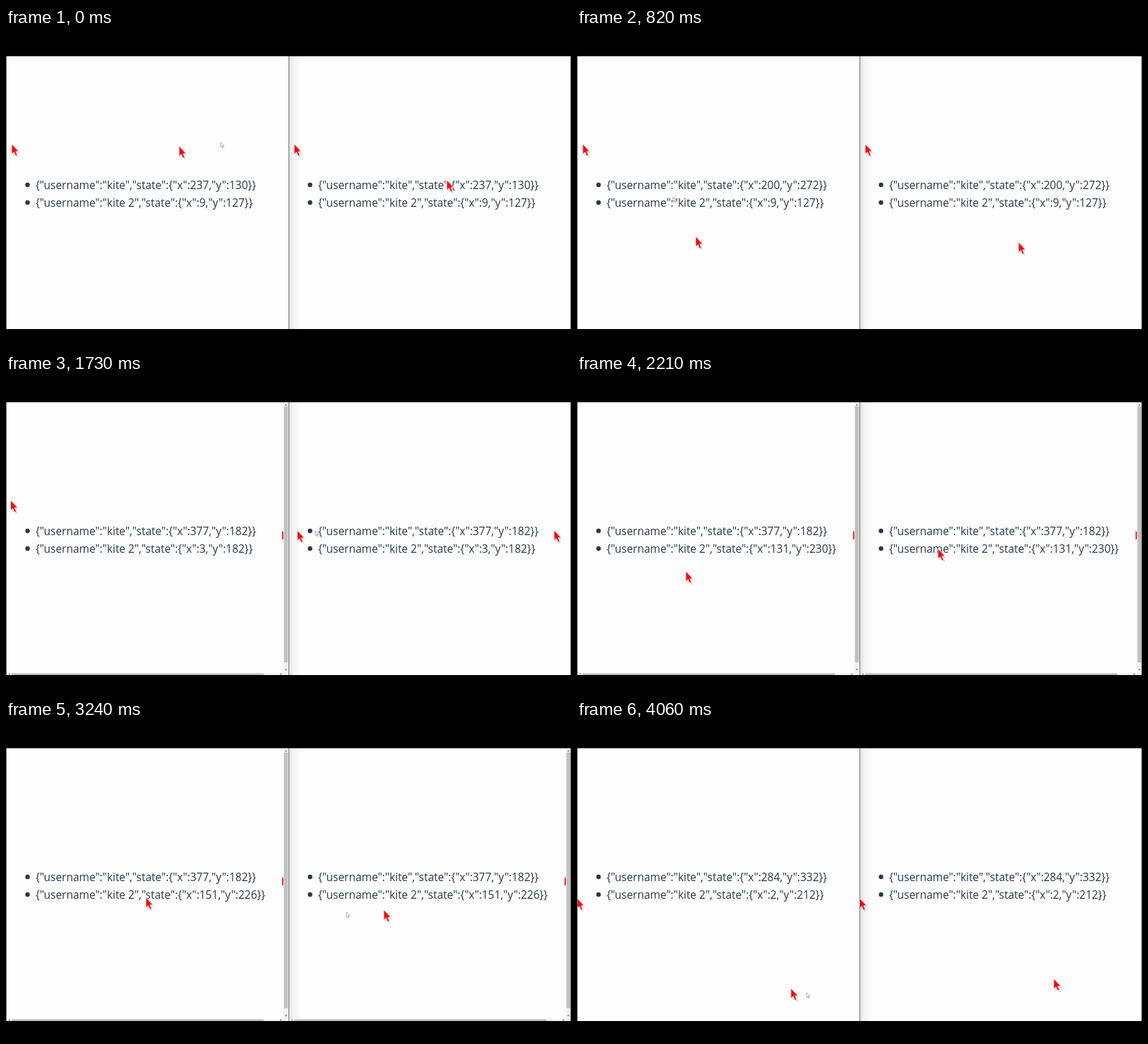
These frames come from a looping animation (800 px wide and 450 px high, 4.09 s). An HTML page:

```html
<!DOCTYPE html>
<html lang="en">
<head>
<meta charset="utf-8">
<title>Shared cursors</title>
<style>
  html, body { margin: 0; width: 100%; height: 100%; overflow: hidden; background: #000; }
  svg { display: block; }
  text { font: 15.46px "Open Sans", "Noto Sans", sans-serif; fill: #283848; }
</style>
</head>
<body>
<svg width="800" height="450" viewBox="0 0 800 450">
  <defs>
    <linearGradient id="shade">
      <stop offset="0" stop-color="#e2e2e2"/>
      <stop offset=".35" stop-color="#f3f3f3"/>
      <stop offset="1" stop-color="#fdfdfd"/>
    </linearGradient>
    <g id="pointer">
      <path d="M2 3V17L5 14.5L7.5 19L10 18L8 13H12Z" fill="#999" opacity=".3"/>
      <path d="M0 0V14.6L3.3 11.8L5.6 17.2L8.2 16.1L5.9 10.8H10.2Z"
            fill="#f40a0e" stroke="#fff" stroke-width=".8" stroke-linejoin="round"/>
    </g>
    <g id="bars">
      <path d="M392.6 40H400V426H0V423H392.6z" fill="#f1f1f1"/>
      <path d="M393.6 46h5.6v362h-5.6zM8 423.4h357v2.6h-357z" fill="#c1c1c1"/>
      <path d="M394.6 44.5l1.7-2l1.7 2zM394.6 417.5l1.7 2l1.7-2zM388.5 423.2l2 1.4l-2 1.4zM5.5 423.2l-2 1.4l2 1.4z" fill="#666"/>
    </g>
  </defs>
  <rect y="40" width="800" height="386" fill="#fdfdfd"/>
  <rect x="401" y="40" width="16" height="386" fill="url(#shade)"/>
  <g id="panels"></g>
  <path d="M.5 40V426M400.5 40V426M799.5 40V426" stroke="#777"/>
  <path id="mouse" d="M0 0V6.6L1.6 5.2L2.7 7.6L3.7 7.1L2.7 4.8H4.8Z" fill="#fff" stroke="#888" stroke-width=".7"/>
</svg>
<script>
const LOOP = 4090, STEP = LOOP / 135;
const NEAR = 75, FAR = 140, LABEL = 105; // network delays in ms
const ENTER = 1620, LEAVE = 3345;        // when the mouse is in the right panel

// Key points: time, x, y and the turns swept on the way there (clockwise > 0)
const first = [
  [-140, 224, 215], [-105, 245, 167], [-75, 245, 167], [0, 304, 162, .1],
  [680, 225, 303, 1.42], [715, 207, 315], [745, 168, 295], [820, 136, 239, .1],
  [1050, 310, 230, .5], [1330, 130, 235, .42], [1590, 376, 221, .26],
  [ENTER, 390.5, 221], [3330, 390.5, 221], [LEAVE, 388, 250],
  [3920, 275, 366, -.35], [3955, 294, 377], [4060, 325, 386], [LOOP, 329, 387]
];
const second = [
  [-140, 8, 164], [1578, 8, 164], [1625, 2, 221], [1730, 38, 222],
  [2070, 154, 279, .6], [2105, 135, 271], [2135, 111, 247], [2210, 107, 219, .1],
  [2360, 205, 240, .5], [2520, 110, 235, .45], [2680, 340, 183, .12],
  [2715, 346, 169], [2820, 351, 163], [3100, 198, 251, -.15],
  [3135, 156, 267], [3240, 82, 272], [3330, 0, 252], [LOOP, 0, 252]
];

// Point on the circular arc that joins the two keys around time t
function at(keys, t) {
  const i = Math.max(1, keys.findIndex(k => k[0] > t));
  const [t0, x0, y0] = keys[i - 1], [t1, x1, y1, turns = 0] = keys[i];
  const u = (t - t0) / (t1 - t0), half = Math.PI * turns;
  const size = half ? Math.sin(half * u) / Math.sin(half) : u;
  const c = size * Math.cos(half * (u - 1)), s = size * Math.sin(half * (u - 1));
  const dx = x1 - x0, dy = y1 - y0;
  return [x0 + dx * c - dy * s, y0 + dx * s + dy * c];
}

// The page is shown slightly enlarged, so convert back to its own pixels
function label(name, [px, py]) {
  const x = Math.max(2, Math.round((px + .85) / 1.037));
  const y = Math.round((py - 32.5) / 1.037);
  return `{"username":"${name}","state":{"x":${x},"y":${y}}}`;
}

function add(parent, tag, attrs) {
  const el = document.createElementNS("http://www.w3.org/2000/svg", tag);
  for (const key in attrs) el.setAttribute(key, attrs[key]);
  return parent.appendChild(el);
}

function move(el, [x, y], dx = 0) {
  el.setAttribute("transform", `translate(${(x + dx).toFixed(2)} ${y.toFixed(2)})`);
}

const mouse = document.getElementById("mouse");
const panels = [0, 400].map(left => {
  const box = add(document.getElementById("panels"), "svg",
    { x: left, y: 0, width: 400, height: 426, viewBox: "0 0 400 426", overflow: "hidden" });
  const lines = [227.5, 252.5].map(y => {
    add(box, "circle", { cx: 30.5, cy: y - 5.5, r: 3.2, fill: "#283848" });
    return add(box, "text", { x: 42, y });
  });
  const pointers = [0, 1].map(() => add(box, "use", { href: "#pointer" }));
  const bars = add(box, "use", { href: "#bars" });
  return { lines, pointers, bars };
});

function draw(t) {
  const words = [
    label("kite", at(first, t - LABEL)),
    label("kite 2", at(second, t - LABEL))
  ];
  panels.forEach(({ lines, pointers, bars }, side) => {
    const a = at(first, t - (side ? FAR : NEAR));
    move(pointers[0], a);
    move(pointers[1], at(second, t - (side ? NEAR : FAR)));
    bars.style.display = a[0] > 385 ? "" : "none";
    lines.forEach((line, i) => { line.textContent = words[i]; });
  });
  const onRight = t >= ENTER && t < LEAVE;
  move(mouse, at(onRight ? second : first, t), onRight ? 400 : 0);
}

const start = performance.now();
function tick() {
  const t = (performance.now() - start) % LOOP;
  const shown = Math.floor((t + 3) / STEP) % 135;
  draw(Math.round(shown * STEP / 10) * 10);
  requestAnimationFrame(tick);
}
tick();
</script>
</body>
</html>
```
